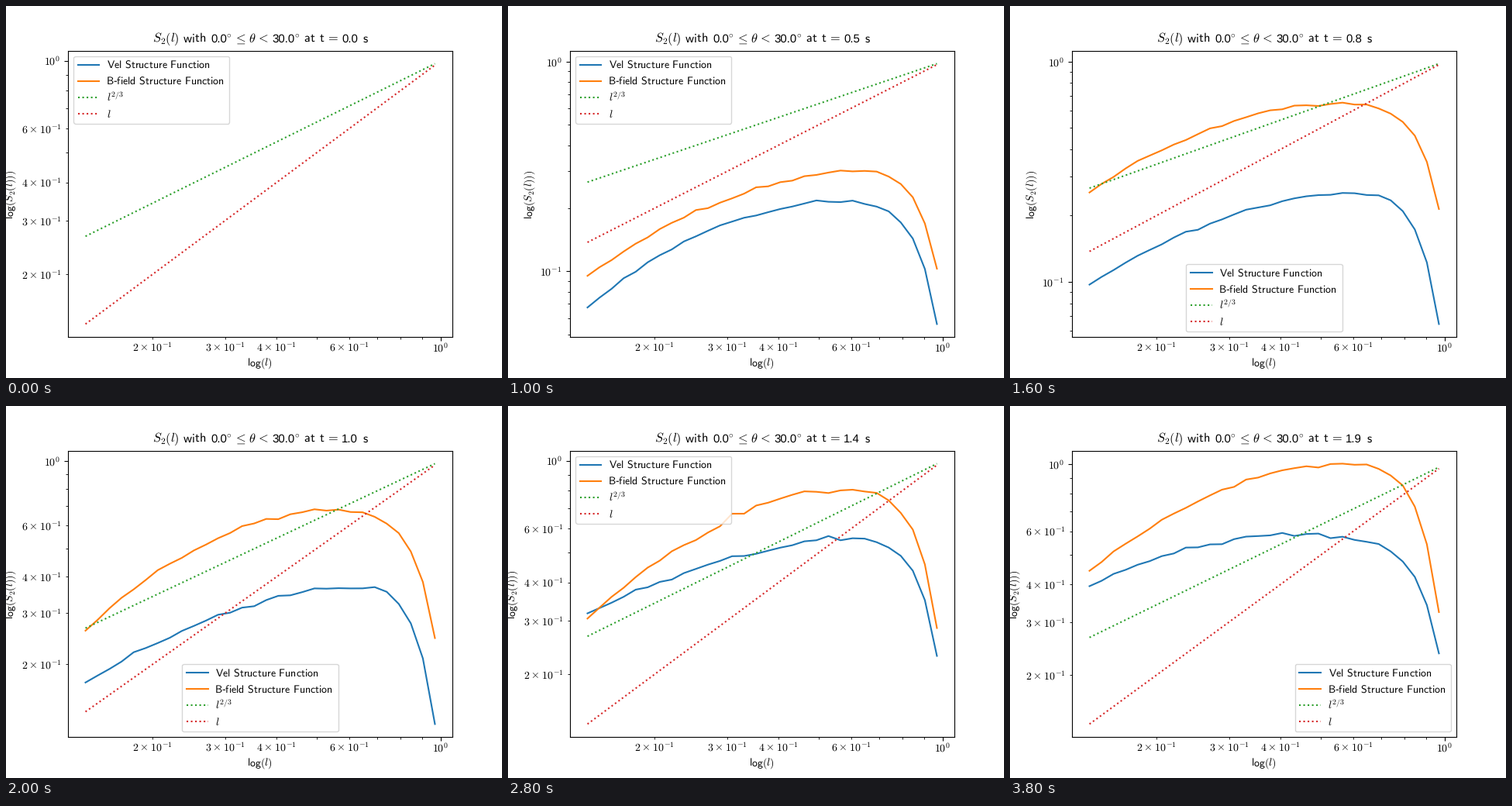
Recreate the animation shown at these times as a matplotlib script. Size 640x480 px, loop 4 s.

```python
import numpy as np
import matplotlib.pyplot as plt
from matplotlib.animation import FuncAnimation
from matplotlib.patches import FancyBboxPatch
from matplotlib.ticker import LogLocator, NullFormatter
from matplotlib.transforms import Affine2D

plt.rcParams.update({
    "font.family": "Liberation Sans",
    "font.size": 10,
    "mathtext.fontset": "cm",
    "text.hinting": "none",
})

W, H = 640, 480
LEFT, RIGHT, TOP, BOTTOM = 80, 576, 57.6, 427.2
FRAMES, INTERVAL = 20, 200

# Separation scales.
N = 30
l = np.geomspace(0.1376, 0.968, N)
u = np.linspace(0, 1, N)

# Key shapes at a few steps: -log10(S2) at the start, peak and end of the curve,
# and the position of the peak along it.
STEPS = [2, 5, 8, 12, 16, 19]
VEL = [
    (1.376, 0.851, 1.404, 0.73),
    (1.172, 0.660, 1.251, 0.75),
    (1.012, 0.583, 1.191, 0.85),
    (0.556, 0.276, 0.669, 0.98),
    (0.450, 0.220, 0.612, 0.82),
    (0.404, 0.230, 0.627, 0.60),
]
MAG = [
    (1.903, 1.307, 1.658, 0.75),
    (1.021, 0.507, 0.987, 0.86),
    (0.594, 0.186, 0.669, 0.75),
    (0.574, 0.150, 0.559, 0.72),
    (0.466, 0.038, 0.537, 0.86),
    (0.353, -0.010, 0.490, 0.78),
]


def curve(keys, step, seed):
    """Parabolic rise and steep final drop, growing as a power law in time."""
    k = int(np.clip(np.searchsorted(STEPS, step) - 1, 0, len(STEPS) - 2))
    f = np.log(step / STEPS[k]) / np.log(STEPS[k + 1] / STEPS[k])
    start, peak, end, top = (1 - f) * np.array(keys[k]) + f * np.array(keys[k + 1])
    arc = peak + (start - peak) * (1 - u / top) ** 2
    drop = (end - arc[-1]) * 0.54 ** np.arange(N)[::-1]
    jitter = np.random.default_rng([seed, step]).normal(0, 0.010, N) * np.sqrt(u * (1 - u))
    return 10 ** -(arc + drop + jitter)


def sf(s):
    """Sans-serif math text with full word spaces."""
    return r"\mathsf{" + s.replace(" ", r"\hspace{0.38}") + "}"


def power(digit, exp):
    head = "" if digit == 1 else rf"\mathrm{{{digit}}}\hspace{{0.05}}\times\hspace{{0.05}}"
    return rf"${head}\mathrm{{10}}^{{\mathrm{{{exp}}}}}$"


fig = plt.figure(figsize=(W / 100, H / 100), dpi=100, facecolor="white")
ax = fig.add_axes([LEFT / W, 1 - BOTTOM / H, (RIGHT - LEFT) / W, (BOTTOM - TOP) / H])
ax.set_xscale("log")
ax.set_yscale("log")
for axis in (ax.xaxis, ax.yaxis):
    axis.set_minor_locator(LogLocator(subs=np.arange(2, 10)))
    axis.set_major_formatter(NullFormatter())
    axis.set_minor_formatter(NullFormatter())

vel, = ax.plot([], [], "C0-")
mag, = ax.plot([], [], "C1-")
ax.plot(l, l ** (2 / 3), "C2:")
ax.plot(l, l, "C3:")

# Overlay in pixel coordinates for all lettering and the legend.
px = fig.add_axes([0, 0, 1, 1])
px.axis("off")


def label(x, y, s, ha="center", **kw):
    return px.text(x, y, s, ha=ha, va="baseline", **kw)


def limits(lo, hi):
    """Log10 limits with a 5 % margin on each side."""
    lo, hi = np.log10([lo, hi])
    pad = 0.05 * (hi - lo)
    return lo - pad, hi + pad


def ticks(lo, hi):
    """Labelled ticks between two log10 limits: (digit, exponent, log10 value)."""
    digits = (1, 2, 3, 4, 6) if hi - lo <= 1 else (1,)
    for exp in range(int(np.floor(lo)), int(np.ceil(hi)) + 1):
        for d in digits:
            v = exp + np.log10(d)
            if lo <= v <= hi:
                yield d, exp, v


x0, x1 = limits(l[0], l[-1])
ax.set_xlim(10 ** x0, 10 ** x1)
for d, e, v in ticks(x0, x1):
    label(LEFT + (RIGHT - LEFT) * (v - x0) / (x1 - x0), 447 if d == 1 else 446, power(d, e))

# Title: symbols and words in math text, numbers in plain sans.
S2 = r"S_{\mathrm{2}}(l)"
GAP = r"\hspace{0.117}"
for x, s in [
    (189, S2 + sf(" with")),
    (284, r"{}^{\circ}" + GAP + r"\leq" + GAP + r"\theta" + GAP + "<"),
    (372, r"{}^{\circ}" + sf(" at t") + r"\hspace{0.18}="),
    (459.5, sf("s")),
]:
    label(x, 47, f"${s}$", ha="left", fontsize=11.75)
label(264, 47, "0.0", ha="left", fontsize=10.8)
label(343.5, 47, "30.0", ha="left", fontsize=10.8)
clock = label(433, 47, "", ha="left", fontsize=10.8)

label(327, 465, "$" + sf("log(") + "l" + sf(")") + "$")
ylabel = label(32, 243, "$" + sf("log(") + S2 + sf("))") + "$",
               rotation=90, rotation_mode="anchor")

# Legend, built at the upper left and moved as a whole.
shift = Affine2D()
moved = shift + px.transData
px.add_patch(FancyBboxPatch((86.9, 64.5), 201.4, 87.7,
                            boxstyle="round,pad=0,rounding_size=2.78",
                            fc="white", ec="0.8", lw=1, alpha=0.8,
                            snap=True, transform=moved))
ENTRIES = [
    (130, "C0-", "$" + sf("Vel Structure Function") + "$"),
    (129, "C1-", "$" + sf("B") + "$-$" + sf("field Structure Function") + "$"),
    (129.5, "C2:", r"$l^{\mathrm{2/3}}$"),
    (129.5, "C3:", "$l$"),
]
for i, (x, style, s) in enumerate(ENTRIES):
    y = 76 + 21 * i
    px.plot([92.5, 120.3], [y, y], style, transform=moved)
    label(x, y + 5, s, ha="left", transform=moved)
px.set_xlim(0, W)
px.set_ylim(H, 0)

UPPER_LEFT, LOWER_MID, LOWER_RIGHT = (0, 0), (140.4, 268.2), (280.8, 268.2)


def legend_spot(step):
    if step == 1 or 8 <= step <= 10:
        return LOWER_MID
    if step == 2 or step >= 16:
        return LOWER_RIGHT
    return UPPER_LEFT


ylabels = []


def update(step):
    lo, hi = l[0], l[-1] ** (2 / 3)
    for seed, (line, keys) in enumerate(((vel, VEL), (mag, MAG))):
        if step == 0:
            line.set_data([], [])
            continue
        s = curve(keys, step, seed)
        line.set_data(l, s)
        lo, hi = min(lo, s.min()), max(hi, s.max())

    y0, y1 = limits(lo, hi)
    ax.set_ylim(10 ** y0, 10 ** y1)
    while ylabels:
        ylabels.pop().remove()
    for d, e, v in ticks(y0, y1):
        y = BOTTOM - (BOTTOM - TOP) * (v - y0) / (y1 - y0)
        ylabels.append(label(69.6 if d == 1 else 71.8, y + 6.5, power(d, e), ha="right"))

    ylabel.set_x(10 if y1 - y0 <= 1 else 32)
    clock.set_text(f"{step / 10:.1f}")
    shift.clear().translate(*legend_spot(step))
    return []


anim = FuncAnimation(fig, update, frames=FRAMES, interval=INTERVAL,
                     init_func=lambda: update(0), repeat=True, repeat_delay=0, blit=False)
plt.show()
```
